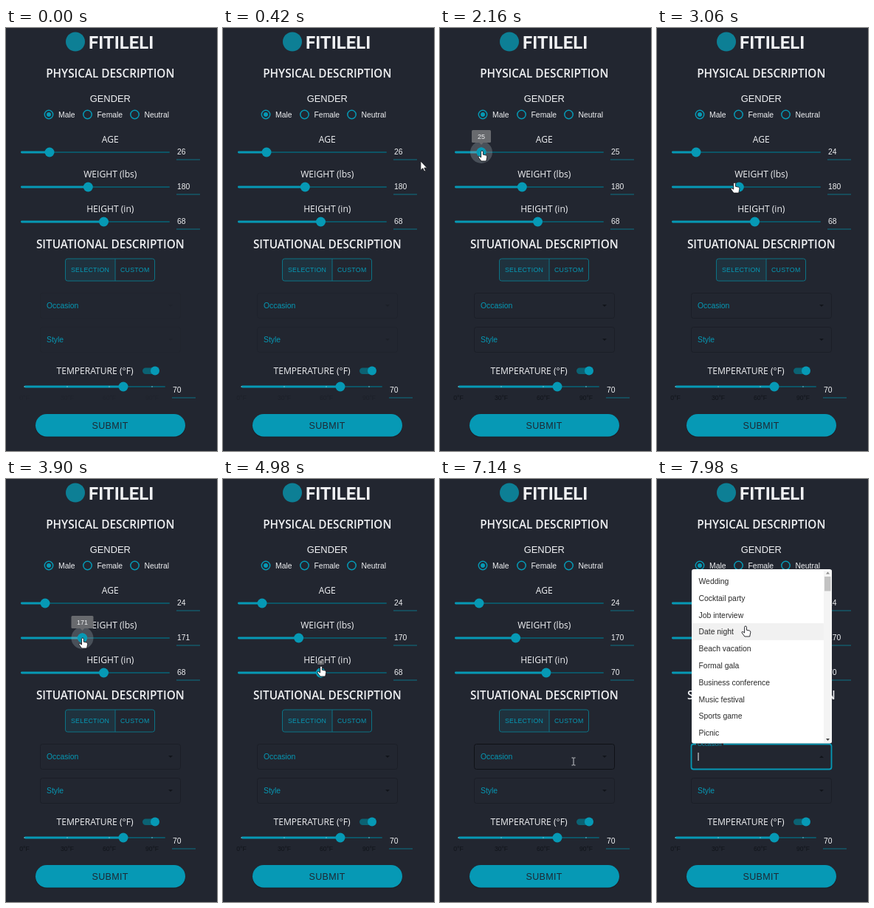
Animation of 286x572 px, one loop 8 s. Source, as an HTML page:

```html
<!DOCTYPE html>
<html lang="en">
<head>
<meta charset="utf-8">
<style>
  html, body { margin: 0; width: 100%; height: 100%; overflow: hidden; background: #222630; }
  svg { display: block; width: 286px; height: 572px; font-family: "Liberation Sans", Arial, sans-serif; }
  .open { font-family: "Open Sans", "Noto Sans", sans-serif; }
</style>
</head>
<body>
<svg id="stage" viewBox="0 0 286 572"></svg>
<script>
const LOOP = 8000;
const TEAL = '#0699b5', DIM = '#0d5566', LINE = '#0c7285', PALE = '#f0f1f3';
const stage = document.getElementById('stage');

const options = ['Wedding', 'Cocktail party', 'Job interview', 'Date night', 'Beach vacation',
  'Formal gala', 'Business conference', 'Music festival', 'Sports game', 'Picnic'];

// Each slider: thumb x = x0 + (value - base) * step; held = time span of the drag.
const sliders = [
  { label: 'AGE', y: 168, base: 26, x0: 59, step: 3, held: [1950, 2700],
    keys: [[1900, 26], [2100, 25], [2200, 25], [2500, 24]] },
  { label: 'WEIGHT (lbs)', y: 215, base: 180, x0: 111.3, step: 0.87, held: [3250, 4550],
    keys: [[3300, 180], [3720, 172], [3840, 172], [3920, 171], [4100, 171], [4160, 170]] },
  { label: 'HEIGHT (in)', y: 262, base: 68, x0: 132.5, step: 5.7, held: [4930, 6350],
    keys: [[5400, 68], [5900, 70]] },
];

const pointerPath = [
  [250, 300, 190], [1000, 57, 114], [1600, 57, 114], [1850, 59, 166], [2000, 59, 166],
  [2160, 57, 166], [2350, 53, 166], [2700, 53, 166], [3150, 111, 214], [3300, 111, 214],
  [3720, 104, 215], [4550, 103, 215], [4850, 133, 253], [5400, 133, 253], [5900, 145, 254],
  [6350, 145, 254], [6900, 181, 382], [7440, 181, 382], [7850, 120, 199],
];

const clamp = v => Math.max(0, Math.min(1, v));
const smooth = v => v * v * (3 - 2 * v);
const fade = (t, [from, to], d = 150) => clamp((t - from) / d) * clamp((to + d - t) / d);

function along(keys, t, ease = v => v) {
  const i = keys.findIndex(k => k[0] > t);
  if (i === 0) return keys[0].slice(1);
  if (i < 0) return keys[keys.length - 1].slice(1);
  const a = keys[i - 1], b = keys[i], p = ease((t - a[0]) / (b[0] - a[0]));
  return a.slice(1).map((v, n) => v + (b[n + 1] - v) * p);
}

const text = (s, x, y, size, fill = PALE, extra = '') =>
  `<text x="${x}" y="${y}" font-size="${size}" fill="${fill}" ${extra}>${s}</text>`;
const middle = (s, y, size, extra = '', x = 141.3) =>
  text(s, x, y, size, PALE, `text-anchor="middle" ${extra}`);
const rect = (x, y, w, h, fill, extra = '') =>
  `<rect x="${x}" y="${y}" width="${w}" height="${h}" fill="${fill}" ${extra}/>`;
const circle = (x, y, r, fill, extra = '') =>
  `<circle cx="${x}" cy="${y}" r="${r}" fill="${fill}" ${extra}/>`;
const path = (d, fill, extra = '') => `<path d="${d}" fill="${fill}" ${extra}/>`;

const track = (x1, x2, y, thumb) =>
  rect(x1, y - 1, x2 - x1, 2, DIM, 'rx="1"') +
  rect(x1, y - 1.4, thumb - x1, 2.8, TEAL, 'rx="1.4"') +
  circle(thumb, y, 6.5, TEAL);
const field = (value, x, y) =>
  text(value, x, y, 10.4) + rect(x - 1, y + 6.5, 32, 1, LINE);

function slider(s, t) {
  const value = Math.round(along(s.keys, t)[0]);
  const x = s.x0 + (value - s.base) * s.step;
  const p = fade(t, s.held);
  const w = String(value).length > 2 ? 30 : 26;
  const bubble = p && `<g transform="translate(${x} ${s.y - 10}) scale(${p})">` +
    rect(-w / 2, -20, w, 17, '#686a6e', 'rx="1.5"') + path('M-3-3.2H3L0 0Z', '#686a6e') +
    middle(value, -8.3, 9, '', 0) + '</g>';
  return middle(s.label, s.y - 13, 12.1, 'class="open"') +
    track(20, 222, s.y, x) + field(value, 232, s.y + 3) +
    (p ? circle(x, s.y, 15 * p, '#a5b2ba', 'opacity=".3"') + circle(x, s.y, 6.5, TEAL) + bubble : '');
}

function radios(hover) {
  return [['Male', 58], ['Female', 110.5], ['Neutral', 174.5]].map(([name, x], i) =>
    (i === 0 && hover ? circle(x, 117, 11, TEAL, 'opacity=".16"') : '') +
    circle(x, 117, 5.7, 'none', `stroke="${TEAL}" stroke-width="1.5"`) +
    (i === 0 ? circle(x, 117, 3, TEAL) : '') +
    text(name, x + 13, 121, 10.4)).join('');
}

function selects(t, hover, open, ramp) {
  const border = open ? TEAL : hover ? '#0f1116' : '#1b1e27';
  const box = (y, stroke, w, o) =>
    rect(46.5, y, 190, 34, 'none', `rx="3" stroke="${stroke}" stroke-width="${w}" opacity="${o}"`);
  const arrow = (y, up) =>
    path(up ? `M220 ${y + 2}h6l-3-3z` : `M220 ${y - 1}h6l-3 3z`, '#11141a', `opacity="${ramp}"`);
  const label = open
    ? rect(53, 356, 37, 5, '#222630') + text('Occasion', 55, 361, 7.8, TEAL) +
      (t % 1000 > 250 ? rect(55.5, 370, 1, 11, PALE) : '')
    : text('Occasion', 55, 378.5, 10.4, TEAL);
  return box(358.5, border, open ? 1.8 : 1, open || hover ? 1 : ramp) + label + arrow(375, open) +
    box(404.5, '#1b1e27', 1, ramp) + text('Style', 55, 424.5, 10.4, TEAL) + arrow(421);
}

function temperature(ramp) {
  const ticks = [25, 83, 140, 198].map((x, i) =>
    circle(x, 485, 0.8, '#7ec6d2') +
    text(`${i * 30}°F`, x, 503, 8.6, '#11141a', `text-anchor="middle" opacity="${ramp}"`)).join('');
  return middle('TEMPERATURE (°F)', 468, 12.1, 'class="open"', 120.5) +
    rect(185, 459.5, 21, 8.5, '#0b6273', 'rx="4.2"') + circle(202, 463.5, 6, TEAL) +
    track(25, 216, 485, 159) + ticks + field(70, 226, 493);
}

function menu(p, y) {
  const rows = options.map((name, i) => {
    const top = 127 + i * 22.8, lit = y >= top && y < top + 22.8;
    return (lit ? rect(47, top - 0.3, 179, 22.8, '#f1f1f1') : '') + text(name, 56.5, top + 15, 10.4, '#2a2a2a');
  }).join('');
  return `<g opacity="${p}" transform="translate(0 ${240 * (1 - p) * 0.4}) scale(1 ${0.6 + 0.4 * p})">` +
    rect(47, 122, 190, 235.5, '#fff', 'rx="3"') + rows +
    rect(226, 123, 10.5, 233.5, '#f4f4f4') + rect(227, 132, 8.5, 19.5, '#c2c2c2') +
    path('M229 128.5h5l-2.5-3z', '#888') + path('M229 351h5l-2.5 3z', '#444') + '</g>';
}

function pointer(x, y, kind) {
  const outline = 'stroke="#15171c" stroke-width=".9" stroke-linejoin="round"';
  const shapes = {
    hand: path('M-1.4 1.3Q-1.4 0 0 0T1.4 1.3V5.2L5.3 6Q7 6.5 6.8 8.3L5.7 14H-1.2L-5 8.8Q-5.2 7-3.4 7.6L-1.4 9Z', '#fff', outline),
    beam: path('M-2.5-5H-.6L0-4.4 .6-5H2.5M0-4.4V4.4M-2.5 5H-.6L0 4.4 .6 5H2.5', 'none', 'stroke="#c9cbcf" stroke-width="1"'),
    arrow: path('M0 0V12.5L3 9.8 4.9 14 6.8 13.2 5 9.2H8.8Z', '#fff', outline),
  };
  return `<g transform="translate(${x} ${y})">${shapes[kind]}</g>`;
}

function scene(t) {
  const [x, y] = along(pointerPath, t, smooth);
  const opened = smooth(clamp((t - 7290) / 150));
  const ramp = clamp(0.15 + t / 2400);
  const inField = x > 46 && x < 237 && y > 358 && y < 393;
  const onRadio = Math.hypot(x - 58, y - 117) < 11;
  const onTrack = x > 18 && x < 224 && sliders.some(s => Math.abs(s.y - y) < 11);
  const inMenu = opened > 0 && x > 47 && x < 237 && y > 122 && y < 357;
  const kind = inField ? 'beam' : onRadio || onTrack || inMenu ? 'hand' : 'arrow';
  const heading = 'class="open" font-weight="600"';
  const button = `letter-spacing=".25"`;

  return rect(0, 0, 286, 572, '#222630') +
    circle(94, 18.5, 13, '#0d7f95') +
    text('FITILELI', 112, 28, 24, PALE, 'font-weight="700" font-family="Roboto, sans-serif"') +
    middle('PHYSICAL DESCRIPTION', 67.3, 15.3, heading) +
    middle('GENDER', 99.5, 12.9) + radios(onRadio) +
    sliders.map(s => slider(s, t)).join('') +
    middle('SITUATIONAL DESCRIPTION', 298, 15.3, heading) +
    rect(80.5, 312, 67.5, 30, TEAL, 'rx="3" opacity=".1"') +
    rect(80.5, 312, 121, 30, 'none', `rx="3" stroke="${LINE}"`) + rect(147.5, 312, 1, 30, LINE) +
    text('SELECTION', 88, 330.3, 8.8, TEAL, button) + text('CUSTOM', 155, 330.3, 8.8, TEAL, button) +
    selects(t, inField, opened > 0, ramp) + temperature(ramp) +
    rect(40, 524, 203, 30, '#191c24', 'rx="15" opacity=".6"') + rect(40, 522, 203, 30.5, TEAL, 'rx="15.2"') +
    text('SUBMIT', 116.5, 542, 12.5, '#1d2833', 'letter-spacing=".35"') +
    (opened > 0 ? menu(opened, y) : '') + pointer(x, y, kind);
}

function draw() {
  stage.innerHTML = scene(performance.now() % LOOP);
  requestAnimationFrame(draw);
}
draw();
</script>
</body>
</html>
```
